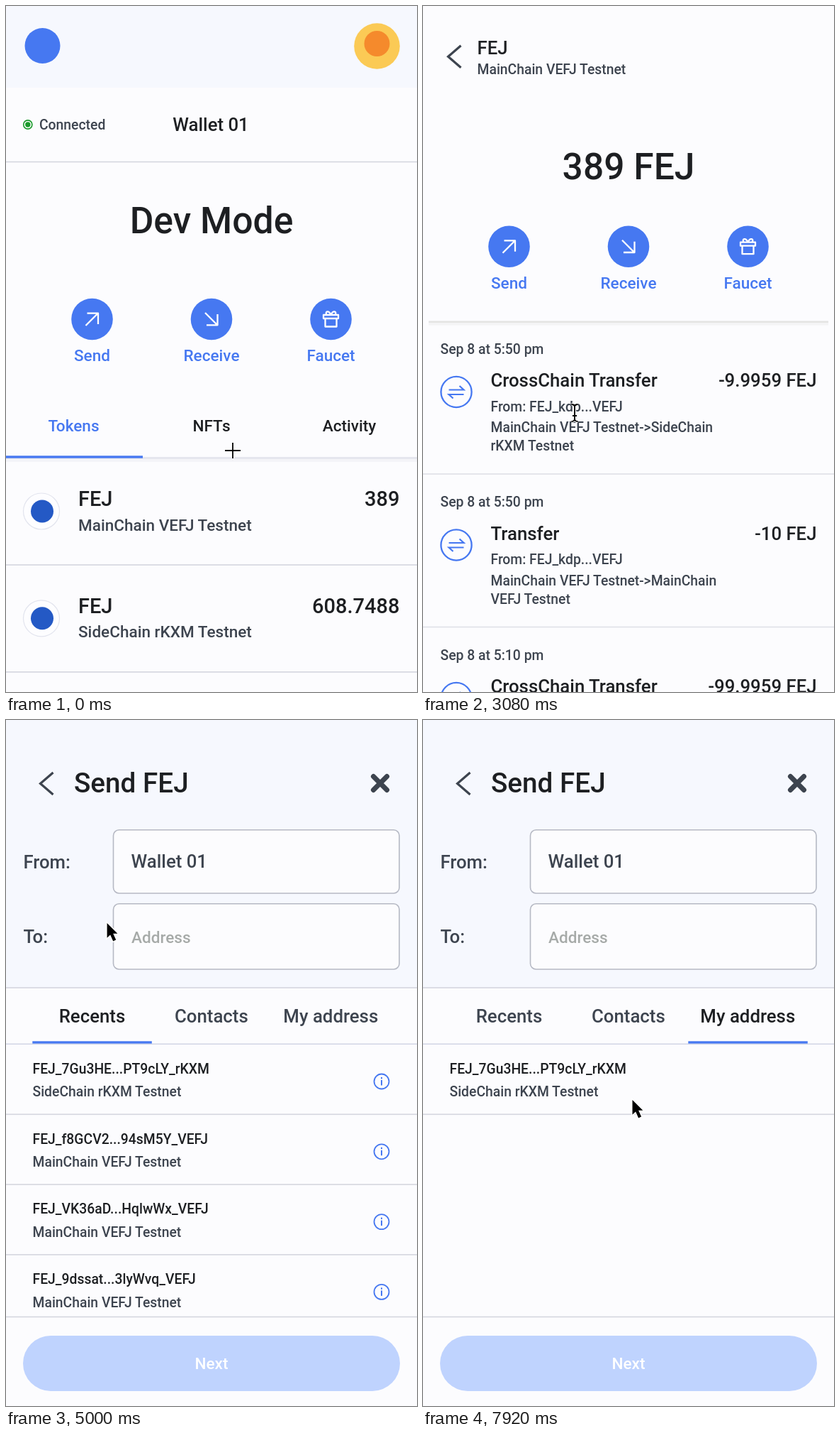
Recreate the animation shown at these times as an HTML page. Size 580x966 px, loop 8000 ms.

```html
<!DOCTYPE html>
<html lang="en">
<head>
<meta charset="utf-8">
<title>Wallet walkthrough</title>
<style>
html, body { margin: 0; width: 100%; height: 100%; overflow: hidden; background: #fcfcfe; }
svg { display: block; width: 100vw; height: 100vh; font-family: Roboto, Arial, sans-serif; font-weight: 500; }
</style>
</head>
<body>
<svg id="stage" viewBox="0 0 580 966"></svg>
<script>
const BLUE = '#4678f1', INK = '#1d1f22', GREY = '#3d444f', LINE = '#d5d6df', BG = '#fcfcfe', TINT = '#f6f8fe';
const U = 580 / 360; // stage pixels per layout pixel
const COIN = 'FEJ', MAIN = 'MainChain VEFJ Testnet', SIDE = 'SideChain rKXM Testnet';

// Text whose capitals are centred on y
function text(x, y, str, size, fill = INK, anchor = 'start') {
  const px = size * U;
  return `<text x="${x}" y="${(y + px * 0.355).toFixed(2)}" font-size="${px.toFixed(2)}" fill="${fill}" text-anchor="${anchor}">${str.replace(/>/g, '&gt;')}</text>`;
}
const rect = (x, y, w, h, fill, more = '') => `<rect x="${x}" y="${y}" width="${w}" height="${h}" fill="${fill}" ${more}/>`;
const disc = (x, y, r, fill, more = '') => `<circle cx="${x}" cy="${y}" r="${r}" fill="${fill}" ${more}/>`;
const stroke = (d, color, width, more = '') => `<path d="${d}" fill="none" stroke="${color}" stroke-width="${width}" ${more}/>`;
const rule = (y, color = LINE) => rect(0, y - 0.8, 580, 1.6, color);
const chevron = (x, y) => stroke(`M${x + 18} ${y - 15.5}L${x} ${y}L${x + 18} ${y + 15.5}`, GREY, 3.2);

function actions(y) {
  const icons = [
    'M-9 9L8 -8M-7 -8.3H8.5V7',
    'M-9 -9L8 8M8.5 -7V8.3H-7',
    'M-10.5 -6H10.5V-1H-10.5ZM-8 -1V10.5H8V-1M0 -6C-3 -13 -9 -11 -6 -6M0 -6C3 -13 9 -11 6 -6'
  ];
  return ['Send', 'Receive', 'Faucet'].map((label, i) => {
    const x = 121.5 + i * 168.5;
    return disc(x, y, 29.3, BLUE) +
      stroke(icons[i], '#fff', 2.3, `transform="translate(${x} ${y})" stroke-linejoin="round"`) +
      text(x, y + 51.3, label, 14, BLUE, 'middle');
  }).join('');
}

function tokenRow(y, chain, amount) {
  return disc(50, y, 25.5, '#fdfdff', 'stroke="#e2e4ee" stroke-width="1.2"') + disc(51, y, 16, '#2459c5') +
    text(102, y - 18, COIN, 18) + text(102, y + 19, chain, 14, GREY) +
    text(555.5, y - 18, amount, 18, INK, 'end') + rule(y + 75.5);
}

function home() {
  return rect(0, 0, 580, 115, TINT) + disc(51.5, 56, 25, BLUE) +
    disc(523.5, 56.5, 32.3, '#fbca55') + disc(523.5, 53, 18, '#f58a2c') +
    disc(30.8, 167, 6.1, '#fff', 'stroke="#1a9a2b" stroke-width="1.6"') + disc(30.8, 167, 3.7, '#1a9a2b') +
    text(47, 167, 'Connected', 12, GREY) + text(289, 166.5, 'Wallet 01', 16, INK, 'middle') +
    rule(219.5) + text(290, 302, 'Dev Mode', 32, INK, 'middle') + actions(441) +
    text(95.5, 591, 'Tokens', 14, BLUE, 'middle') + text(290, 591, 'NFTs', 14, INK, 'middle') +
    text(484.5, 591, 'Activity', 14, INK, 'middle') +
    rect(0, 635, 580, 3, '#e5e6ee') + rect(0, 638, 580, 4, '#f4f4f8') + rect(0, 633.3, 193, 3.4, BLUE) +
    tokenRow(711.5, MAIN, '389') + tokenRow(862.3, SIDE, '608.7488');
}

function transfer(y, when, title, amount, lines) {
  return text(24.5, y, when, 12, GREY) + disc(47, y + 60.5, 21.6, 'none', `stroke="${BLUE}" stroke-width="2.3"`) +
    stroke('M-10.5 -3H10.5L4.5 -8.5M10.5 3.5H-10.5L-4.5 9', BLUE, 2.2, `transform="translate(47 ${y + 60.5})"`) +
    text(95.5, y + 44, title, 16) + text(555.5, y + 44, amount + ' ' + COIN, 16, INK, 'end') +
    text(95.5, y + 81, `From: ${COIN}_kdp...VEFJ`, 12, GREY) +
    lines.map((s, i) => text(95.5, y + 110.5 + i * 26, s, 12, GREY)).join('') + rule(y + 176, '#dfe0e6');
}

function token() {
  return chevron(35.5, 71.3) + text(76.5, 58.5, COIN, 16) + text(76.5, 89, MAIN, 12, GREY) +
    text(290, 226, '389 ' + COIN, 32, INK, 'middle') + actions(338.7) +
    rect(8, 443.5, 564, 2.5, '#e4e4e3') + rect(8, 446, 564, 3.5, '#f4f4f5') +
    transfer(483, 'Sep 8 at 5:50 pm', 'CrossChain Transfer', '-9.9959', [MAIN + '->SideChain', 'rKXM Testnet']) +
    transfer(698.5, 'Sep 8 at 5:50 pm', 'Transfer', '-10', [MAIN + '->MainChain', 'VEFJ Testnet']) +
    transfer(914, 'Sep 8 at 5:10 pm', 'CrossChain Transfer', '-99.9959', []);
}

const field = (y, h) => rect(151.5, y, 403.5, h, BG, 'rx="8" stroke="#b6b9c4" stroke-width="1.6"');

function sendForm() {
  return rect(0, 0, 580, 377, TINT) + chevron(48.5, 89.5) + text(96, 88.5, 'Send ' + COIN, 24) +
    stroke('M518.5 79.5L537.5 98.5M537.5 79.5L518.5 98.5', GREY, 7, 'stroke-linecap="round"') +
    text(24.5, 199.5, 'From:', 16, GREY) + text(24.5, 305, 'To:', 16, GREY) +
    field(154.8, 89.2) + field(258.8, 92.2) +
    text(176.5, 199, 'Wallet 01', 16, GREY) + text(177, 306, 'Address', 14, '#a6aaa8') +
    rule(377) + rule(456.3, '#d3d7e6') + rule(840.5) +
    rect(24, 867, 532, 78, '#bfd3fe', 'rx="39"') + text(290, 905.5, 'Next', 14, '#fff', 'middle');
}

function addressRow(i, name, chain, info) {
  const y = 491 + i * 98.8;
  return text(37.5, y, name, 12) + text(37.5, y + 32.3, chain, 12, GREY) +
    (info ? disc(530, y + 18, 10.5, 'none', `stroke="${BLUE}" stroke-width="1.8"`) +
      rect(529, y + 16, 2, 7.5, BLUE) + rect(529, y + 12, 2, 2.3, BLUE) : '') +
    (i < 3 ? rule(y + 64.3) : '');
}

const tab = (x, label, on) => text(x, 416.5, label, 16, on ? INK : GREY, 'middle');
const tabs = active => ['Recents', 'Contacts', 'My address'].map((s, i) => tab(121.5 + i * 168.4, s, i === active)).join('');

const names = ['7Gu3HE...PT9cLY_rKXM', 'f8GCV2...94sM5Y_VEFJ', 'VK36aD...HqlwWx_VEFJ', '9dssat...3lyWvq_VEFJ']
  .map(s => COIN + '_' + s);
const recents = () => tabs(0) + names.map((s, i) => addressRow(i, s, i ? MAIN : SIDE, true)).join('');
const mine = () => tabs(2) + addressRow(0, names[0], SIDE, false);

const outlined = (d, width) => stroke(d, '#fff', width + 2) + stroke(d, '#000', width);
const cursors = {
  cross: outlined('M-11 0H11M0 -11V11', 1.8),
  beam: outlined('M-4.5 -12Q0 -12 0 -8.5V8.5Q0 12 -4.5 12M4.5 -12Q0 -12 0 -8.5M0 8.5Q0 12 4.5 12M-3 4H3', 1.9),
  arrow: '<path d="M0 0V20.8L4.6 16.4L8.6 25.4L12.6 23.6L8.6 14.8H14.8Z" fill="#000" stroke="#fff" stroke-width="3" paint-order="stroke"/>',
  hand: '<g transform="translate(-9 -4)"><path d="M6 4C5.5 1 10 .5 10.5 4L11.5 12C11.5 9.5 15 9.5 15.5 12C15.5 10 19 10 19.5 13C19.5 11 23 11.5 23 14.5V20C23 24 21 25 21 28.5H10C10 26 8 24 6 21L2 16.5C.5 14 3.5 12.5 5.5 14.5L7.5 16Z" fill="#fff" stroke="#000" stroke-width="1.7" stroke-linejoin="round"/>' +
    stroke('M12.2 18.5V24.5M15.2 18.5V24.5M18.2 18.5V24.5', '#000', 1.3) + '</g>'
};

// Pointer path: step (12 per second), x, y, shape from there on
const path = [
  [6, 320, 626, 'cross'], [7, 317, 632, 'cross'], [9, 296, 678, 'cross'], [12, 273, 713, 'cross'],
  [14, 273, 713, 'cross'], [16, 282, 730, 'cross'], [23, 282, 730, 'cross'], [25, 248, 721, 'cross'],
  [26, 248, 721, 'cross'], [27, 246.5, 710.5, 'arrow'], [36, 246.5, 710.5, 'arrow'],
  [37, 214, 573, 'beam'], [38, 190, 500, 'arrow'], [41, 126, 352, 'hand'], [43, 122, 341, 'hand'],
  [45, 130, 340, 'hand'], [46, 136.7, 341.5, 'arrow'], [59, 136.7, 341.5, 'arrow'],
  [60, 142.6, 286, 'arrow'], [62, 56, 203, 'beam'], [63, 80, 245, 'arrow'], [65, 177.5, 324, 'beam'],
  [67, 177.5, 324, 'beam'], [68, 186, 342, 'beam'], [69, 205, 385, 'arrow'], [71, 270, 460, 'arrow'],
  [73, 360, 474, 'arrow'], [75, 440, 448, 'hand'], [77, 484, 415, 'hand'], [85, 484, 415, 'hand'],
  [86, 478, 400, 'hand'], [88, 425, 351, 'beam'], [90, 320, 352, 'beam'], [92, 250, 405, 'hand'],
  [93, 246, 450, 'hand'], [94, 266, 495, 'arrow'], [95, 295.5, 535, 'arrow']
];

const mix = (a, b, p) => a + (b - a) * p;
const ease = p => { p = Math.min(1, Math.max(0, p)); return p * p * (3 - 2 * p); };

function pointer(step) {
  if (step <= path[0][0]) return path[0];
  const i = path.findLastIndex(k => k[0] <= step), a = path[i], b = path[i + 1] || a;
  const p = b === a ? 0 : (step - a[0]) / (b[0] - a[0]);
  return [step, mix(a[1], b[1], p), mix(a[2], b[2], p), a[3]];
}

function inkBar(step) {
  const shrink = ease((step - 46) / 3), slide = ease((step - 79) / 5);
  const left = mix(1, 37.3, shrink) + 337 * slide, width = mix(279, 168.5, shrink);
  return [left, width];
}

const stage = document.getElementById('stage');
const group = (id, body) => `<g id="${id}">${body}</g>`;
stage.innerHTML = rect(0, 0, 580, 966, BG) + group('home', home()) + group('token', token()) +
  group('send', sendForm() + group('recents', recents()) + group('mine', mine()) +
    rect(0, 452.3, 0, 3.3, BLUE, 'id="bar"')) +
  Object.keys(cursors).map(k => group(k, cursors[k])).join('');
const el = id => document.getElementById(id);
const show = (id, on) => el(id).setAttribute('display', on ? 'inline' : 'none');

function draw(ms) {
  const step = Math.floor(ms * 0.012 + 0.1);
  show('home', step < 28);
  show('token', step >= 28 && step < 46);
  show('send', step >= 46);
  show('recents', step < 80);
  show('mine', step >= 80);
  const [left, width] = inkBar(step);
  el('bar').setAttribute('x', left);
  el('bar').setAttribute('width', width);
  const [, x, y, shape] = pointer(step);
  for (const k in cursors) show(k, k === shape);
  el(shape).setAttribute('transform', `translate(${x} ${y})`);
}

const start = performance.now();
function tick() {
  draw((performance.now() - start) % 8000);
  requestAnimationFrame(tick);
}
tick();
</script>
</body>
</html>
```
